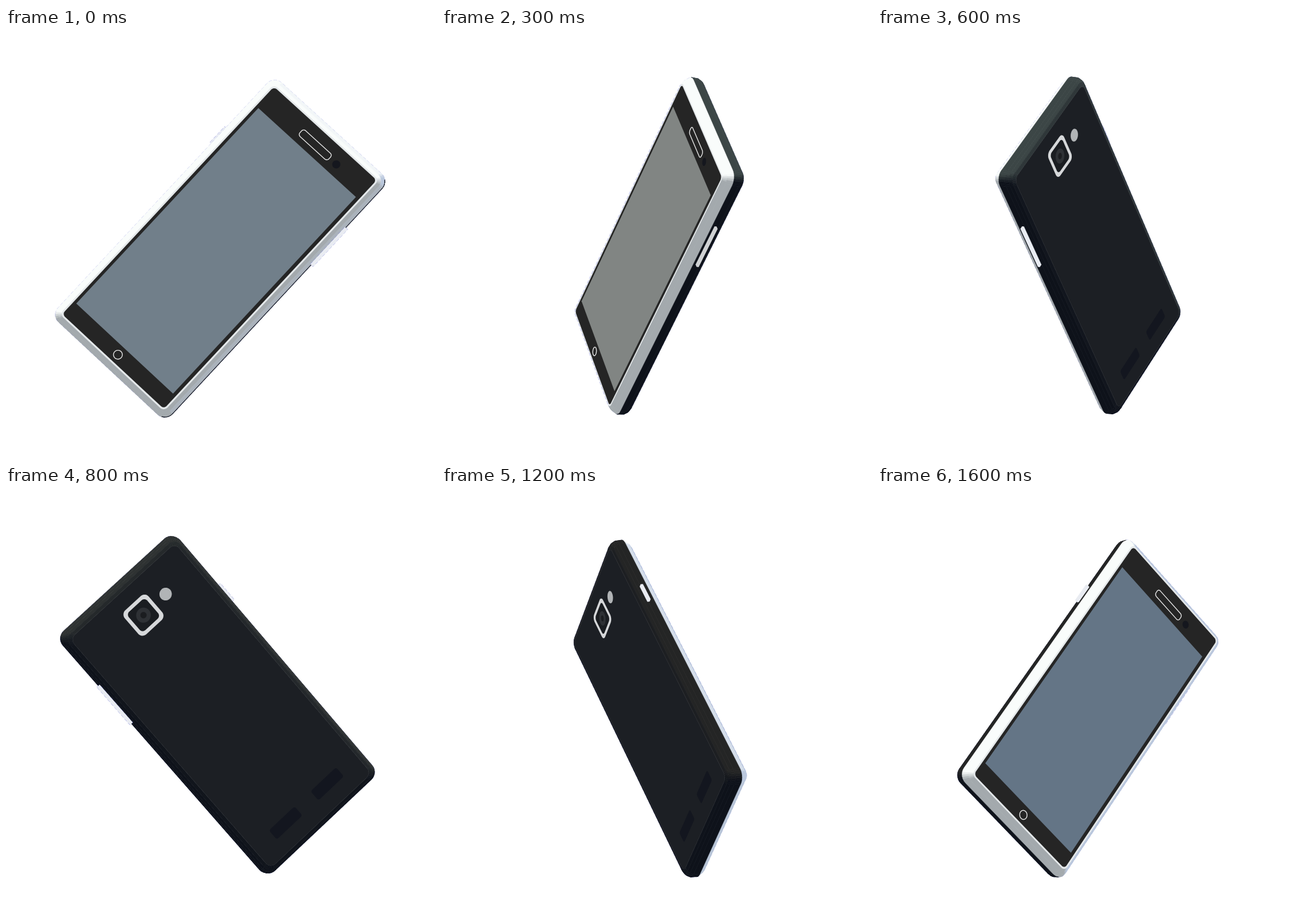
An HTML page with a canvas for the animation above (1700 ms loop, 748 by 748 pixels).

```html
<!DOCTYPE html>
<html lang="en">
<head>
<meta charset="utf-8">
<title>Turning phone</title>
<style>
html, body { margin: 0; width: 100%; height: 100%; overflow: hidden; background: #fff; }
canvas { display: block; width: 100vw; height: 100vh; }
</style>
</head>
<body>
<canvas id="stage" width="748" height="748"></canvas>
<script>
const ctx = document.getElementById('stage').getContext('2d');
const STEP_MS = 100, STEPS = 17, STEP_DEG = 19.9;
const CAMERA = 5300;
const CENTRE = [372.3, 383.3];
const RAD = Math.PI / 180;

// Body cross-sections from the screen side to the back: half width, half height, radius, depth.
const BEVEL = [[124, 273, 9, 21], [130.5, 279.5, 14, 15], [136, 285, 18, 5]];
const SHELL = [[136, 285, 18, 5], [135.5, 284.5, 18, -7], [133, 282, 17, -13], [129, 278, 15, -17], [123, 272, 12, -19]];

const clamp = x => Math.max(0, Math.min(1, x));
const mix = (a, b, t) => a.map((v, i) => v + (b[i] - v) * t);
const rgb = c => `rgb(${c.map(Math.round).join(',')})`;
const cross = (a, b) => [
  a[1] * b[2] - a[2] * b[1],
  a[2] * b[0] - a[0] * b[2],
  a[0] * b[1] - a[1] * b[0]
];
const sub = (a, b) => a.map((v, i) => v - b[i]);

let angle, axisU, axisV, axisN;

function setPose(step) {
  angle = step * STEP_DEG * RAD;
  const spin = (radius, rise, phase) => [
    radius * Math.cos(angle + phase * RAD), rise, radius * Math.sin(angle + phase * RAD)
  ];
  axisU = spin(0.7415, 0.674, 9);
  axisV = spin(0.6815, 0.732, 179);
  axisN = cross(axisU, axisV);
}

const toWorld = ([u, v, n]) => [0, 1, 2].map(i => u * axisU[i] + v * axisV[i] + n * axisN[i]);

function toScreen(p) {
  const [x, y, z] = toWorld(p);
  const s = 1 + z / CAMERA;
  return [CENTRE[0] + x * s, CENTRE[1] + y * s];
}

function roundRect(cu, cv, hw, hh, r, depth) {
  const points = [];
  const corners = [[1, 1], [-1, 1], [-1, -1], [1, -1]];
  corners.forEach(([su, sv], q) => {
    for (let i = 0; i <= 7; i++) {
      const a = (q + i / 7) * Math.PI / 2;
      points.push([
        cu + su * (hw - r) + r * Math.cos(a),
        cv + sv * (hh - r) + r * Math.sin(a),
        depth
      ]);
    }
  });
  return points;
}

const disc = (cu, cv, r, depth) => roundRect(cu, cv, r, r, r, depth);
const ring = ([hw, hh, r, depth]) => roundRect(0, 0, hw, hh, r, depth);

function trace(points) {
  ctx.beginPath();
  points.forEach(p => ctx.lineTo(p[0], p[1]));
  ctx.closePath();
}

function fill(points, color) {
  trace(points.map(toScreen));
  ctx.fillStyle = color;
  ctx.fill();
}

function outline(points, color, width) {
  trace(points.map(toScreen));
  ctx.strokeStyle = color;
  ctx.lineWidth = width;
  ctx.stroke();
}

function silver([nx, ny]) {
  const lit = mix([163, 169, 173], [249, 252, 251], clamp(0.5 - ny * 1.6));
  return mix(lit, [186, 200, 221], clamp((nx - 0.53) * 4));
}

function black([, ny]) {
  const top = mix([36, 37, 37], [64, 75, 75], Math.max(0, Math.sin(angle)));
  return mix([14, 18, 26], top, clamp(0.5 - ny * 1.4));
}

// Skins neighbouring cross-sections with shaded quads, leaving out those that face away.
function loft(layers, shade) {
  const rings = layers.map(ring);
  for (let k = 0; k + 1 < rings.length; k++) {
    const a = rings[k], b = rings[k + 1];
    a.forEach((p, i) => {
      const j = (i + 1) % a.length;
      const w = toWorld(p);
      const normal = cross(sub(toWorld(b[i]), w), sub(toWorld(b[j]), w));
      const size = Math.hypot(...normal);
      if (normal[2] <= 0) return;
      const color = rgb(shade(normal.map(v => v / size)));
      const quad = [p, a[j], b[j], b[i]];
      fill(quad, color);
      outline(quad, color, 0.7);
    });
  }
}

function hull(points) {
  const sorted = [...points].sort((a, b) => a[0] - b[0] || a[1] - b[1]);
  const half = list => {
    const chain = [];
    for (const p of list) {
      while (chain.length > 1) {
        const [a, b] = chain.slice(-2);
        if ((b[0] - a[0]) * (p[1] - a[1]) - (b[1] - a[1]) * (p[0] - a[0]) > 0) break;
        chain.pop();
      }
      chain.push(p);
    }
    return chain.slice(0, -1);
  };
  return [...half(sorted), ...half(sorted.reverse())];
}

function edgeLine(points) {
  trace(hull(points.map(toScreen)));
  ctx.strokeStyle = 'rgba(72,76,205,.75)';
  ctx.lineWidth = 0.9;
  ctx.setLineDash([6, 3]);
  ctx.stroke();
  ctx.setLineDash([]);
}

function sideButton(side, v0, v1, n0, n1) {
  const box = [];
  for (const u of [134, 140]) for (const v of [v0, v1]) for (const n of [n0, n1]) box.push([side * u, v, n]);
  const facing = side * axisU[2];
  if (facing < 0.3) edgeLine(box);
  trace(hull(box.map(toScreen)));
  ctx.fillStyle = side > 0 && facing > 0.6 ? '#cfd1d3' : '#e9ecf2';
  ctx.fill();
}

function drawFront() {
  const s = Math.sin(angle), c = Math.cos(angle);
  const z = 21;
  fill(ring(BEVEL[0]), '#e4e8ea');
  fill(roundRect(0, 0, 121, 270, 7, z), '#252525');
  fill(roundRect(-0.5, 7.8, 115, 232, 0, z), rgb([113 + 19 * s, 119 + 12 * s + 8 * c, 123 + 15 * c]));
  outline(roundRect(1, -243.5, 34, 7, 5, z), '#e8e8e8', 1.4);
  fill(disc(51, -243, 7, z), '#15171e');
  outline(disc(-1.5, 255.5, 7.7, z), '#e8e8e8', 1.4);
}

function drawBack() {
  const z = -19;
  fill(ring(SHELL[4]), '#1c1f24');
  for (const u of [-51, 50]) fill(roundRect(u, 230.5, 31, 11, 4, z), '#13161f');
  fill(disc(-53, -217, 11, z), '#b1b4b6');
  fill(roundRect(0, -216, 28, 28, 10, z), '#d6d8da');
  fill(roundRect(0, -216, 21.5, 21.5, 7, z), '#1a1d21');
  fill(disc(0, -216, 13, z), '#2e3135');
  fill(disc(0, -216, 5.5, z), '#1b1d20');
}

function draw(step) {
  setPose(step);
  ctx.fillStyle = '#fff';
  ctx.fillRect(0, 0, 748, 748);
  ctx.lineJoin = 'round';

  const right = () => sideButton(1, -174, -86, -4.5, -0.5);
  const left = () => sideButton(-1, -162, -125, -8, -3.5);
  const rightFaces = axisU[2] > 0;
  (rightFaces ? left : right)();
  edgeLine([...BEVEL, ...SHELL].flatMap(ring));
  loft(BEVEL, silver);
  loft(SHELL, black);
  (axisN[2] > 0 ? drawFront : drawBack)();
  (rightFaces ? right : left)();
}

function tick(now) {
  draw(Math.floor(now / STEP_MS) % STEPS);
  requestAnimationFrame(tick);
}
tick(performance.now());
</script>
</body>
</html>
```
